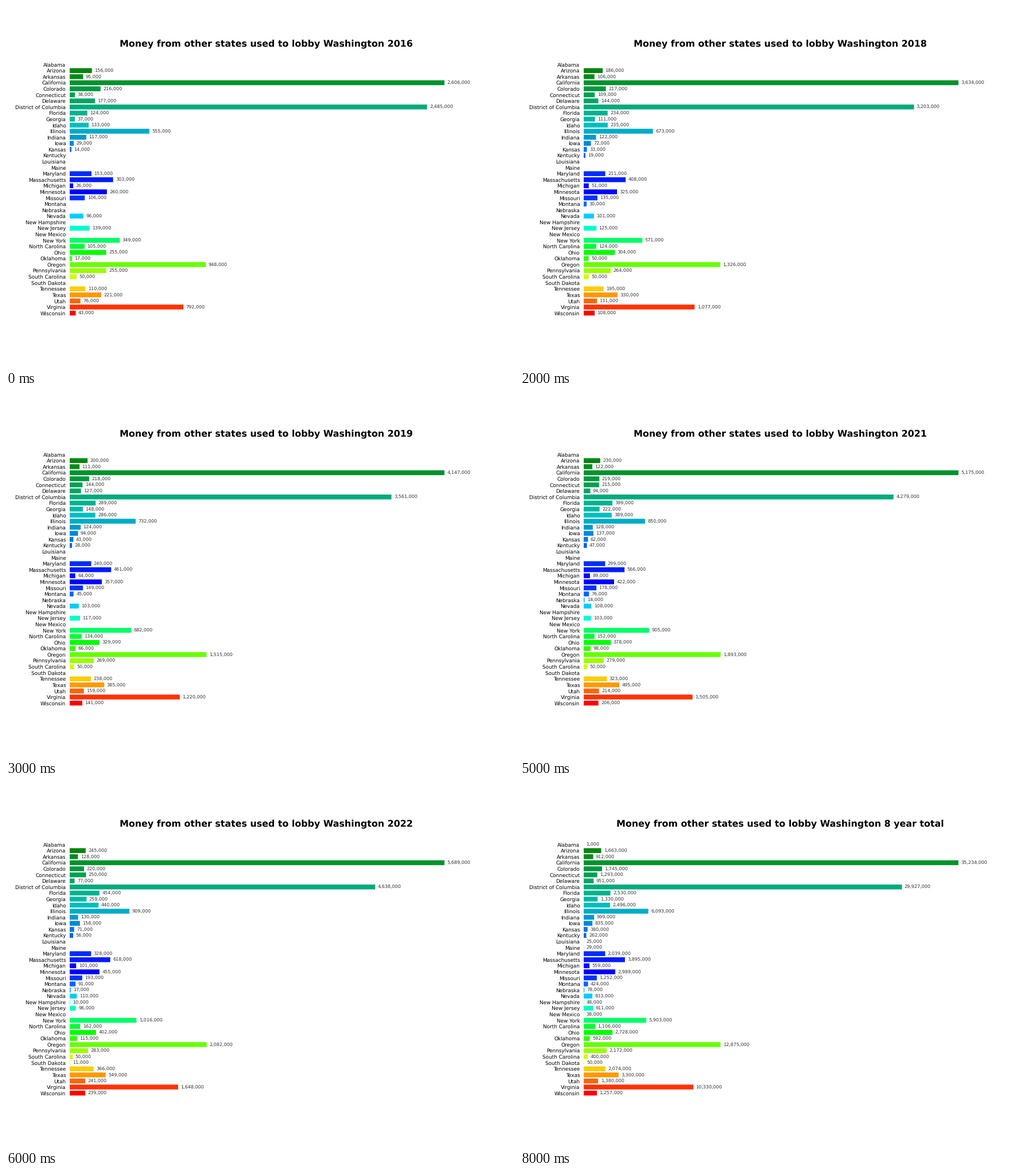
Write a matplotlib script that moves like this. It is 885 px wide and 632 px high and loops after 9 s.

```python
from colorsys import hsv_to_rgb

import numpy as np
import matplotlib.pyplot as plt
from matplotlib.animation import FuncAnimation

W, H, DPI = 885, 632, 64
YEARS = 8
plt.rcParams.update({"font.family": "DejaVu Sans", "text.hinting": "none"})

# Per state: spending in the first year and over all years, in thousands
STATES = {
    "Alabama": (0, 1), "Arizona": (156, 1663), "Arkansas": (95, 912),
    "California": (2606, 35234), "Colorado": (216, 1745), "Connecticut": (38, 1293),
    "Delaware": (177, 951), "District of Columbia": (2485, 29927),
    "Florida": (124, 2530), "Georgia": (37, 1330), "Idaho": (133, 2496),
    "Illinois": (555, 6093), "Indiana": (117, 999), "Iowa": (29, 835),
    "Kansas": (14, 380), "Kentucky": (0, 262), "Louisiana": (0, 25), "Maine": (0, 29),
    "Maryland": (153, 2039), "Massachusetts": (303, 3895), "Michigan": (26, 559),
    "Minnesota": (260, 2989), "Missouri": (106, 1252), "Montana": (0, 424),
    "Nebraska": (0, 78), "Nevada": (96, 833), "New Hampshire": (0, 48),
    "New Jersey": (139, 911), "New Mexico": (0, 38), "New York": (349, 5903),
    "North Carolina": (105, 1106), "Ohio": (255, 2728), "Oklahoma": (17, 592),
    "Oregon": (948, 12875), "Pennsylvania": (255, 2172), "South Carolina": (50, 400),
    "South Dakota": (0, 50), "Tennessee": (110, 2074), "Texas": (221, 3300),
    "Utah": (76, 1380), "Virginia": (792, 10330), "Wisconsin": (43, 1257),
}
first, total = np.array(list(STATES.values())).T
rows = np.arange(len(STATES))


def spending(year):
    """Steady growth that adds up to the total; tiny sums are not reported."""
    if year == YEARS:
        return total * 1000
    slope = (total - YEARS * first) / (YEARS * (YEARS - 1) / 2)
    amount = np.rint(first + slope * year).astype(int)
    return np.where(amount < 10, 0, amount) * 1000


def bar_color(row):
    """Dark green to teal to blue, then back through the rainbow to red."""
    if row > 20:
        return hsv_to_rgb((41 - row) / 30, 1, 1)
    if row < 10:
        green, blue = 128 + 6.2 * row, 190 * (row / 10) ** 1.2
    else:
        green, blue = 18.1 * (20.5 - row), min(255, 190 + 8.1 * (row - 10))
    return 0, green / 255, blue / 255


COLORS = [bar_color(r) for r in rows]
fig, ax = plt.subplots(figsize=(W / DPI, H / DPI), dpi=DPI)


def draw(page):
    ax.clear()
    values = spending(page)
    period = "8 year total" if page == YEARS else 2016 + page
    bars = ax.barh(rows, values, height=0.8, color=COLORS, snap=False)
    labels = [f"{v:,}" if v else "" for v in values]
    ax.bar_label(bars, labels, padding=5, fontsize=9, color="#333333")
    ax.set_title(f"Money from other states used to lobby Washington {period}",
                 fontsize=17.8, fontweight="bold")
    ax.set_yticks(rows, list(STATES), fontsize=10)
    ax.tick_params(left=False)
    ax.xaxis.set_visible(False)
    ax.spines[:].set_visible(False)
    ax.set_xlim(0, values.max() * 1.05)
    ax.invert_yaxis()
    return []


anim = FuncAnimation(fig, draw, frames=YEARS + 1, init_func=lambda: [],
                     interval=1000, repeat=True, repeat_delay=0)
plt.show()
```
